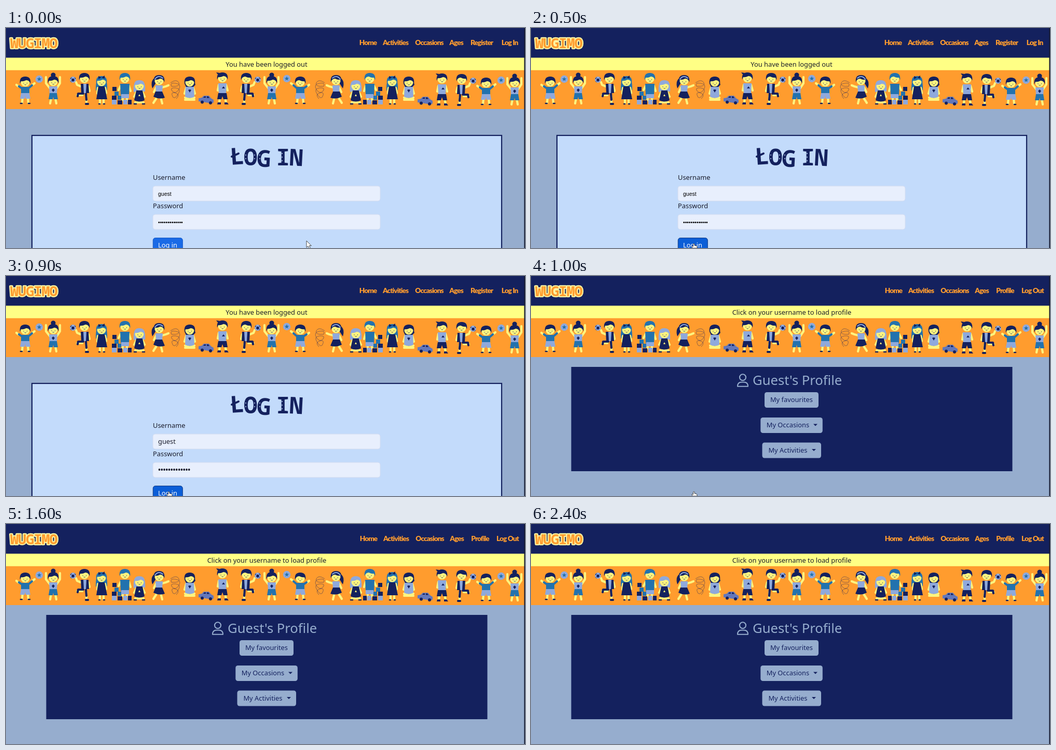
Recreate the animation shown at these times as an HTML page. Size 1000 by 426 pixels, loop 2.5 s.

```html
<!DOCTYPE html>
<html lang="en">
<head>
<meta charset="utf-8">
<title>Log in and profile</title>
<style>
  :root { --navy: #14215e; --sky: #96adce; --orange: #ff9c2e; --skin: #fdf47f; --teal: #2272ae; --pale: #8fa9dc; }
  html, body { margin: 0; width: 100%; height: 100%; overflow: hidden; background: var(--sky); }
  svg { display: block; width: 100vw; height: 100vh; }
  text { font: 12.85px "Noto Sans", sans-serif; fill: #1b1d2c; }
  .mid { text-anchor: middle; }
  .nav text { font: 900 13.6px Lato, sans-serif; letter-spacing: -.9px; fill: var(--orange); text-anchor: middle; }
  .brand { font: 700 27px "Noto Sans Mono", monospace; letter-spacing: -1.1px; fill: var(--orange);
    stroke: #fff3a0; stroke-width: 4.5px; stroke-linejoin: round; paint-order: stroke; }
  .title { font: 700 45px "Noto Sans Mono", monospace; letter-spacing: -2.2px; word-spacing: -12px; fill: var(--navy); }
  .small text { font: 10.5px "Liberation Sans", Arial, sans-serif; fill: #000; }
  .large .dots { font-size: 16px; letter-spacing: -1.25px; }
  .field { fill: #e8effd; stroke: #d3dcf0; }
  .pill rect { fill: var(--sky); }
  .pill text { fill: var(--navy); text-anchor: middle; }
  .n { fill: var(--navy); } .t { fill: var(--teal); } .p { fill: var(--pale); } .k { fill: var(--skin); }
  .limb { fill: none; stroke: var(--skin); stroke-width: 4.2; stroke-linecap: round; stroke-linejoin: round; }
  .sn { stroke: var(--navy); } .st { stroke: var(--teal); } .sp { stroke: var(--pale); }
  .shoe { stroke: var(--navy); stroke-width: 2.6; }
  .thin { fill: none; stroke: var(--navy); stroke-width: .8; }

  .login, .profile, .small, .large, .hover, .arrow, .hand { animation: 2.5s step-end infinite; }
  .login { animation-name: login; }
  .profile { animation-name: profile; }
  .small { animation-name: small; }
  .large { animation-name: large; }
  .hover { animation-name: hover; }
  .arrow { animation-name: arrow; }
  .hand { animation-name: hand; }
  @keyframes login { 0% { visibility: visible } 40%, 100% { visibility: hidden } }
  @keyframes profile { 0% { visibility: hidden } 40%, 100% { visibility: visible } }
  @keyframes small { 0% { opacity: 1 } 28%, 100% { opacity: 0 } }
  @keyframes large { 0% { opacity: 0 } 28%, 100% { opacity: 1 } }
  @keyframes hover { 0% { fill: #1a6ae6; stroke: #1558c4 } 16%, 100% { fill: #0b5ed7; stroke: #123a80 } }
  @keyframes hand { 0% { opacity: 0 } 16% { opacity: 1 } 44%, 100% { opacity: 0 } }
  @keyframes arrow {
    0% { opacity: 1; transform: translate(579px, 412px) }
    4% { opacity: 1; transform: translate(540px, 413px) }
    8% { opacity: 1; transform: translate(450px, 415px) }
    12% { opacity: 1; transform: translate(360px, 418px) }
    16% { opacity: 0; transform: translate(313px, 418px) }
    44% { opacity: 1; transform: translate(315px, 414px) }
    48% { opacity: 1; transform: translate(350px, 335px) }
    52% { opacity: 1; transform: translate(420px, 180px) }
    56% { opacity: 1; transform: translate(462px, 76px) }
    60%, 100% { opacity: 0; transform: translate(462px, 76px) }
  }
</style>
</head>
<body>
<svg viewBox="0 0 1000 426" preserveAspectRatio="none">
  <defs>
    <g id="head">
      <circle class="k" r="8.6"/>
      <path d="M-10 3Q-12-11 0-11Q12-11 10 3Q8-4 2-4Q-4-1-8-2Z" fill="currentColor"/>
      <path class="thin" d="M-3 1v1.6M3.5 1v1.6M-1.5 4.5Q0 6 2 4.5"/>
    </g>
    <g id="star">
      <circle class="p" r="7.2"/>
      <path class="t" d="M0-4.5 1.2-1.4 4.4-1.3 1.9.7 2.7 3.8 0 2-2.7 3.8-1.9.7-4.4-1.3-1.2-1.4Z"/>
    </g>
    <g id="ball">
      <circle class="p" r="6"/>
      <path class="n" d="M-2-2H2L3 2 0 4-3 2ZM-5.5-2-2-5.5-4-1ZM5.5-2 3-5 4-1ZM-4 4.5-5 2-2 5Z"/>
    </g>
    <g id="spread">
      <path class="limb" d="M-17 110-13 113M18 107 14 110M-5 134-6 145M5 134 6 145"/>
      <path class="limb st" d="M-12 113-6 117H6L13 111"/>
      <path class="t" d="M-8 114H8V128H-8Z"/>
      <path class="p" d="M-8 126H8L10 137H1L0 132-1 137H-10Z"/>
      <path class="limb shoe" d="M-6 146H-9M6 146H9"/>
      <use href="#head" y="105"/>
    </g>
    <g id="cheer">
      <path class="limb" d="M-7 116-14 107V95M7 116 13 107V95M-4 136-6 146M4 136 6 146"/>
      <path class="p" d="M-8 113H8L7 128H-7Z"/>
      <path class="t" d="M-7 126H7L9 138H1L0 133-1 138H-9Z"/>
      <circle class="n" cy="91" r="4.6"/>
      <path class="n" d="M0 117 3 120 0 124-3 120Z"/>
      <use href="#head" y="104"/>
    </g>
    <g id="kick">
      <path class="limb" d="M-7 113-14 110-16 105M8 113 10 122M-4 130-14 130M4 132V144"/>
      <path class="limb sn" d="M-2 127-12 127-13 132M3 127 4 139M3 147H7"/>
      <path class="n" d="M-7 108H8L9 126H-6Z"/>
      <path class="p" d="M-2 108H4L3 126H-1Z"/>
      <use href="#head" y="98"/>
      <use href="#ball" x="-22" y="100"/>
    </g>
    <g id="longhair">
      <path class="t" d="M-11 122Q-12 94 0 94T11 120Q6 124 0 119T-11 122Z"/>
      <path class="limb" d="M-7 116-8 127M7 116 9 126M-3 136V146M4 136V146"/>
      <path class="n" d="M-6 113H6L11 138H-10Z"/>
      <path class="limb shoe" d="M-5 147H-3M4 147H6"/>
      <use href="#head" y="104" color="#2272ae"/>
      <path class="n" d="M-6 93 0 96 6 92V98L0 96-6 99Z"/>
    </g>
    <g id="builder">
      <path class="limb" d="M-8 112-12 120M8 112 11 122M-4 132V140M4 132V140"/>
      <path class="t" d="M-9 108H9L8 130H-8Z"/>
      <path class="p" d="M-7 128H8V136H-7ZM-25 139H-16V148H-25ZM-3 139H5V148H-3Z"/>
      <path class="n" d="M-24 114H-16V122H-24ZM-25 131H-16V139H-25ZM-14 140H-5V148H-14ZM6 139H13V148H6Z"/>
      <path class="t" d="M-20 123H-12V131H-20ZM-14 131H-7V139H-14Z"/>
      <use href="#head" y="98" color="#2272ae"/>
    </g>
    <g id="kneelgirl">
      <path class="p" d="M-11 124Q-13 102 0 102T11 123Z"/>
      <path class="limb" d="M-6 124-10 133-3 135M6 124 10 133 3 135M-8 144H8"/>
      <path class="n" d="M-6 121H6L10 140Q0 145-10 140Z"/>
      <path class="limb shoe" d="M-10 147H-6M6 147H10"/>
      <use href="#head" y="112" color="#8fa9dc"/>
      <path class="k" d="M0 128 2 132-2 132Z"/>
    </g>
    <g id="ribbon">
      <path class="n" d="M-6 95Q-18 101-13 117Q-7 108-5 104Z"/>
      <path class="limb" d="M6 115 13 113 18 111M-6 115-10 124M-4 134-11 145M3 134 6 146"/>
      <path class="p" d="M-7 111H7L6 124H-6Z"/>
      <path class="n" d="M-7 123H6L11 135Q0 139-11 133Z"/>
      <use href="#head" y="102"/>
      <path class="limb sp" d="M-8 99Q-1 90 7 97" style="stroke-width:2"/>
      <path class="thin" opacity=".6" d="M22 106Q34 98 38 106T24 113Q20 105 32 107T38 119 25 122Q20 115 32 116T36 129 25 130Q23 123 32 126T33 137"/>
    </g>
    <g id="kneelboy">
      <path class="limb" d="M-7 116-10 127-3 129M7 116 10 127 3 129M-9 139H9M-9 135 0 138 9 135"/>
      <path class="p" d="M-8 113H8L9 133Q0 138-9 133Z"/>
      <path class="n" d="M-10 108-8 98H8L11 110 7 114H-7ZM0 125-3 120Q0 118 3 120Z"/>
      <use href="#head" y="105"/>
    </g>
    <g id="stand">
      <path class="limb" d="M-7 110-9 121-2 122M7 110 10 121M-5 134-6 145M5 134 7 145"/>
      <path class="p" d="M-8 107H8L7 127H-7Z"/>
      <path class="n" d="M-8 126H8L10 138H2L0 132-2 138H-10ZM-9 144H-3V148H-10ZM4 144H9L12 148H4ZM2 113 5 117-1 117ZM-9 90-12 86-5 87Z"/>
      <use href="#head" y="97"/>
    </g>
    <g id="car" fill="#6377ba">
      <path d="M-15 136-9 135-5 131H5L9 136 14 139V144L11 146-15 142Z"/>
      <path class="n" d="M-6 135-4 132.5H-1V135ZM1 132.5H4L6 135.5H1Z"/>
      <circle class="n" cx="-8" cy="143.500" r="3"/><circle class="n" cx="8" cy="145" r="3"/>
    </g>
  </defs>

  <rect width="1000" height="426" fill="#96adce"/>
  <rect class="n" width="1000" height="58"/>
  <rect y="57.5" width="1000" height="25" fill="#ffff85"/>
  <rect y="81.7" width="1000" height="75.3" fill="#ff9c2e"/>
  <text class="brand" x="8" y="39">WUGIMO</text>

  <g color="#14215e">
    <use href="#spread" x="37"/><use href="#star" x="64" y="99"/>
    <use href="#cheer" x="91"/>
    <use href="#kick" x="151"/>
    <use href="#longhair" x="184"/>
    <use href="#builder" x="229"/>
    <use href="#kneelgirl" x="257"/>
    <use href="#ribbon" x="295"/>
    <use href="#kneelboy" x="354"/>
    <use href="#car" x="386"/>
    <use href="#stand" x="417"/>
    <use href="#kick" transform="translate(463) scale(-1 1)"/>
    <use href="#cheer" x="512"/><use href="#star" x="541" y="98"/>
    <use href="#spread" transform="translate(567) scale(-1 1)"/>
    <use href="#ribbon" transform="translate(636) scale(-1 1)"/>
    <use href="#kneelgirl" x="674"/>
    <use href="#builder" transform="translate(701) scale(-1 1)"/>
    <use href="#longhair" x="744"/>
    <use href="#kneelboy" x="776"/>
    <use href="#car" x="808" y="2"/>
    <use href="#stand" x="840" y="2"/>
    <use href="#kick" transform="translate(878 2) scale(-1 1)"/>
    <use href="#spread" x="925" y="2"/><use href="#star" x="954" y="101"/>
    <use href="#cheer" x="980" y="2"/>
  </g>

  <g class="login">
    <g class="nav">
      <text x="697.5" y="33">Home</text><text x="750.5" y="33">Activities</text><text x="815.5" y="33">Occasions</text>
      <text x="867.5" y="33">Ages</text><text x="916.5" y="33">Register</text><text x="970.5" y="33">Log In</text>
    </g>
    <text class="mid" x="502" y="74.5">You have been logged out</text>
    <rect x="50" y="208" width="905" height="230" fill="#c3dbfb" stroke="#14215e" stroke-width="2.2"/>
    <text class="title" x="433" y="265" dy="0 1 2 0 -2 0" rotate="-4 0 3 0 0 3">LOG IN</text>
    <path d="M435 249 448 243" stroke="#14215e" stroke-width="4" stroke-linecap="round"/>
    <path d="M462 246v9M479 246v9M489 246v12M532 243v15" fill="none" stroke="#c3dbfb"
      stroke-width="2" stroke-linecap="round" stroke-dasharray="0 7"/>
    <text x="283" y="294">Username</text>
    <rect class="field" x="283" y="306" width="438" height="29" rx="4.5"/>
    <text x="283" y="349">Password</text>
    <rect class="field" x="283" y="361" width="438" height="29" rx="4.5"/>
    <g class="small">
      <text x="293" y="324.5">guest</text><text x="293" y="379.5">•••••••••••••</text>
    </g>
    <g class="large">
      <text x="293" y="325">guest</text><text class="dots" x="292.5" y="381">•••••••••••••</text>
    </g>
    <rect class="hover" x="283.3" y="406.5" width="57" height="30" rx="4.5"/>
    <text x="293" y="425" style="fill:#fff">Log in</text>
  </g>

  <g class="profile">
    <g class="nav">
      <text x="698.5" y="33">Home</text><text x="751.5" y="33">Activities</text><text x="816.5" y="33">Occasions</text>
      <text x="868.5" y="33">Ages</text><text x="913.5" y="33">Profile</text><text x="966.5" y="33">Log Out</text>
    </g>
    <text class="mid" x="502.5" y="74.5">Click on your username to load profile</text>
    <rect class="n" x="77.5" y="176" width="850" height="202"/>
    <g fill="none" stroke="#96adce" stroke-width="2.1">
      <circle cx="408" cy="196.3" r="6"/>
      <path d="M398 213.7Q398 205.5 406 205.5H410Q418 205.5 418 213.7Z" stroke-linejoin="round"/>
    </g>
    <text x="427" y="211" style="font-size:25.6px;fill:var(--sky)">Guest's Profile</text>
    <g class="pill">
      <rect x="450" y="225" width="104" height="30" rx="4.5"/><text x="502" y="244">My favourites</text>
      <rect x="442.3" y="274" width="119.5" height="30" rx="4.5"/><text x="495" y="293">My Occasions</text>
      <rect x="445.5" y="322.5" width="113.5" height="30" rx="4.5"/><text x="495" y="341.5">My Activities</text>
      <path class="n" d="M544 286.5H552L548 290.5ZM541 335H549L545 339Z"/>
    </g>
  </g>

  <path d="M999.2 0V426" stroke="#10142c" stroke-width="1.6"/>
  <path class="arrow" d="M0 0V13L3 10.3 5 15 7.3 14 5.3 9.5H9.3Z" fill="#fff" stroke="#222" stroke-width=".8"/>
  <path class="hand" d="M312.6 418Q313.8 416.6 315 418V421L319 422Q320.5 422.5 320 426H311.5L309.6 423Q310.5 421.6 312.6 423Z"
    fill="#fff" stroke="#222" stroke-width=".8"/>
</svg>
</body>
</html>
```
